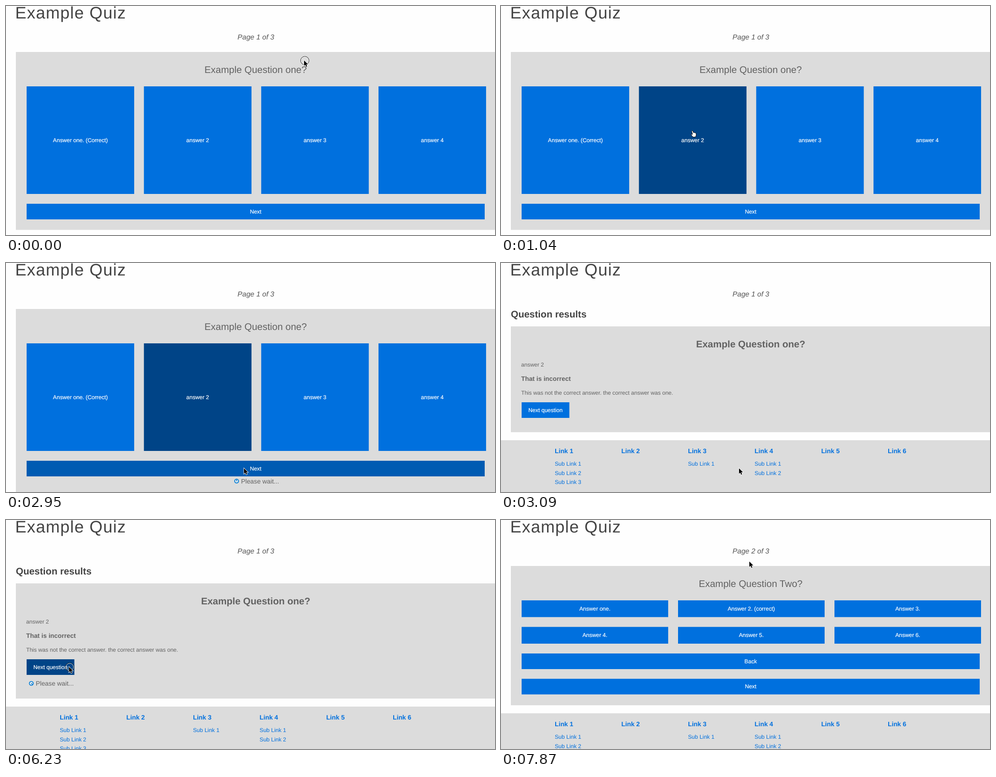
Write an HTML page that moves like this. It is 1091x513 px and loops after 8000 ms.

```html
<!DOCTYPE html>
<html lang="en">
<head>
<meta charset="utf-8">
<title>Example Quiz</title>
<style>
  html, body { margin: 0; width: 100%; height: 100%; overflow: hidden; background: #fefefe; }
  svg { display: block; width: 1091px; height: 513px; }
  text { font-family: "Liberation Sans", Arial, sans-serif; font-size: 12.5px; fill: #626262; text-rendering: geometricPrecision; }
  .title { font-size: 37.4px; letter-spacing: 1.25px; fill: #444; }
  .page { font-size: 16px; font-style: italic; fill: #555; }
  .question { font-size: 21.4px; }
  .heading { font-size: 21.4px; font-weight: bold; }
  .medium { font-size: 14.25px; }
  .bold { font-weight: bold; }
  .dark { fill: #444; }
  .middle { text-anchor: middle; }
  .label { fill: #fff; stroke: #fff; stroke-width: .2px; }
  .link { fill: #0070de; }
  .panel { fill: #dcdcdc; }
  .button { fill: #0070de; }
  .button.hover { fill: #005bb2; }
  .button.active { fill: #004487; }
</style>
</head>
<body>
<svg id="stage" viewBox="0 0 1091 513"></svg>
<script>
const LOOP = 8000;
const stage = document.getElementById('stage');

function add(parent, tag, attrs = {}, content = '') {
  const node = document.createElementNS('http://www.w3.org/2000/svg', tag);
  for (const [key, value] of Object.entries(attrs)) node.setAttribute(key, value);
  node.textContent = content;
  return parent.appendChild(node);
}
const group = parent => add(parent, 'g');
const box = (parent, x, y, width, height, cls = 'panel') =>
  add(parent, 'rect', { x, y, width, height, class: cls });
const write = (parent, x, y, content, cls = '') => add(parent, 'text', { x, y, class: cls }, content);

const buttons = {};
function button(parent, id, label, x, y, width, height) {
  buttons[id] = box(parent, x, y, width, height, 'button');
  write(parent, x + width / 2, y + height / 2 + 4, label, 'label middle');
}

write(stage, 20.5, 28, 'Example Quiz', 'title');
const pageLabel = write(stage, 557.5, 75, '', 'page middle');

const pages = { first: group(stage), result: group(stage), second: group(stage) };
const panels = {
  first: box(pages.first, 22, 103, 1069, 398.5),
  result: box(pages.result, 22, 142, 1069, 237),
  second: box(pages.second, 22, 103, 1069, 312)
};
const panelHeight = { first: 398.5, result: 237, second: 312 };
const footerTop = { first: 519, result: 397, second: 433 };

write(pages.first, 557, 150, 'Example Question one?', 'question middle');
['Answer one. (Correct)', 'answer 2', 'answer 3', 'answer 4'].forEach((label, i) =>
  button(pages.first, 'tile' + (i + 1), label, 46 + i * 261.7, 180, 240, 241));
button(pages.first, 'next', 'Next', 46, 443, 1022, 35);

write(pages.result, 22, 122, 'Question results', 'heading dark');
write(pages.result, 557, 189, 'Example Question one?', 'heading middle');
write(pages.result, 45, 232, 'answer 2');
write(pages.result, 45, 264, 'That is incorrect', 'medium bold');
write(pages.result, 45, 294.5, 'This was not the correct answer. the correct answer was one.');
button(pages.result, 'continue', 'Next question', 46, 312, 106.5, 35);

write(pages.second, 557, 150, 'Example Question Two?', 'question middle');
['Answer one.', 'Answer 2. (correct)', 'Answer 3.', 'Answer 4.', 'Answer 5.', 'Answer 6.'].forEach((label, i) =>
  button(pages.second, 'choice' + i, label, 46 + (i % 3) * 349, i < 3 ? 180 : 239.5, 327, 37.5));
button(pages.second, 'back', 'Back', 46, 299, 1022, 35);
button(pages.second, 'next2', 'Next', 46, 355.7, 1022, 35);

const footer = group(stage);
box(footer, 0, 0, 1091, 180);
[3, 0, 1, 2, 0, 0].forEach((count, i) => {
  const x = 120 + i * 148.6;
  write(footer, x, 28.5, 'Link ' + (i + 1), 'medium bold link');
  for (let n = 0; n < count; n++) write(footer, x, 57 + n * 20.5, 'Sub Link ' + (n + 1), 'link');
});

const wait = group(stage);
write(wait, 10, 5, 'Please wait...', 'medium');
const spinner = group(wait);
add(spinner, 'circle', { r: 4.3, fill: '#eee', stroke: '#0a80d6', 'stroke-width': 2 });
add(spinner, 'path', { d: 'M0 .5V-4', stroke: '#0a80d6', 'stroke-width': 1.8 });
const waitPlace = { first: '514.5 488.5', result: '56.5 366' };

const pointer = group(stage);
const ring = group(pointer);
add(ring, 'circle', { cx: 1.7, cy: .3, r: 9.3, fill: 'none', stroke: '#111' });
add(ring, 'circle', { cx: 1.7, cy: .3, r: 8.3, fill: 'none', stroke: '#fff', 'stroke-opacity': .85 });
const arrow = add(pointer, 'path', {
  d: 'M0 0V12.2L2.8 9.6 4.8 14.2 6.9 13.3 4.9 8.8H8.8Z',
  stroke: '#fff', 'stroke-width': 1.6, 'paint-order': 'stroke'
});
const hand = add(pointer, 'path', {
  d: 'M-1.6 1.4Q-.9-.5.9.8L2.6 5Q3.4 3.8 4.4 5Q5.6 4 6.4 5.4Q8 5 8.2 7L8.4 10.5 7 14.5H1.2L-2.6 9.4Q-2.8 7.4-.8 8.2L.4 8.6Z',
  fill: '#fff', stroke: '#000'
});

// time, pointer x, y, shape, what else changes from here on
const steps = [
  [0, 665, 122, 'click', { page: 'first' }],
  [150, 640, 142, 'arrow'],
  [300, 558, 202, 'arrow'],
  [440, 450, 273, 'hand', { tile2: 'hover' }],
  [590, 427, 279, 'hand'],
  [890, 427, 279, 'click', { tile2: 'active' }],
  [1040, 427, 279, 'hand'],
  [1330, 434, 297, 'hand'],
  [1480, 463, 352, 'hand'],
  [1630, 500, 424, 'arrow'],
  [1780, 525, 452, 'hand', { next: 'hover' }],
  [1920, 531, 460, 'hand'],
  [2210, 531, 460, 'click', { next: 'active', wait: true, spin: 90 }],
  [2360, 531, 460, 'arrow', { next: 'hover', spin: 180 }],
  [2510, 531, 460, 'arrow', { spin: 270 }],
  [2650, 531, 460, 'arrow', { spin: 0 }],
  [2800, 531, 460, 'arrow', { spin: 90 }],
  [2950, 531, 460, 'arrow', { spin: 0 }],
  [3090, 531, 460, 'arrow', { page: 'result', wait: false }],
  [3840, 500, 437, 'arrow'],
  [3990, 336, 246, 'arrow'],
  [4140, 190, 191, 'arrow'],
  [4290, 170, 206, 'arrow'],
  [4430, 148, 250, 'arrow'],
  [4580, 143, 299, 'arrow'],
  [4730, 141, 325, 'hand', { continue: 'hover' }],
  [4880, 140, 330, 'hand'],
  [6230, 140.5, 329, 'click', { continue: 'active', wait: true, spin: 135 }],
  [6380, 140.5, 329, 'arrow', { continue: 'hover', spin: 225 }],
  [6530, 140.5, 329, 'arrow', { spin: 315 }],
  [6680, 140.5, 329, 'arrow', { spin: 45 }],
  [6830, 140.5, 329, 'arrow', { spin: 135 }],
  [6980, 140, 330, 'hand', { page: 'second', wait: false, back: 'hover' }],
  [7420, 171, 317, 'hand'],
  [7570, 328, 224, 'arrow', { back: '' }],
  [7720, 510, 122, 'arrow'],
  [7870, 554, 93, 'arrow']
];

const show = (node, visible) => node.setAttribute('visibility', visible ? 'visible' : 'hidden');

function draw(time) {
  const past = steps.filter(step => step[0] <= time);
  const [, x, y, shape] = past[past.length - 1];
  const state = Object.assign({}, ...past.map(step => step[4]));
  const growth = state.wait ? 21 : 0;

  for (const name in pages) show(pages[name], name === state.page);
  for (const id in buttons) buttons[id].setAttribute('class', 'button ' + (state[id] || ''));
  panels[state.page].setAttribute('height', panelHeight[state.page] + growth);
  footer.setAttribute('transform', `translate(0 ${footerTop[state.page] + growth})`);
  pageLabel.textContent = `Page ${state.page === 'second' ? 2 : 1} of 3`;

  show(wait, state.wait);
  if (state.wait) {
    wait.setAttribute('transform', `translate(${waitPlace[state.page]})`);
    spinner.setAttribute('transform', `rotate(${state.spin})`);
  }

  pointer.setAttribute('transform', `translate(${x} ${y})`);
  show(ring, shape === 'click');
  show(arrow, shape !== 'hand');
  show(hand, shape === 'hand');
}

const start = performance.now();
function tick() {
  draw((performance.now() - start) % LOOP);
  requestAnimationFrame(tick);
}
tick();
</script>
</body>
</html>
```
